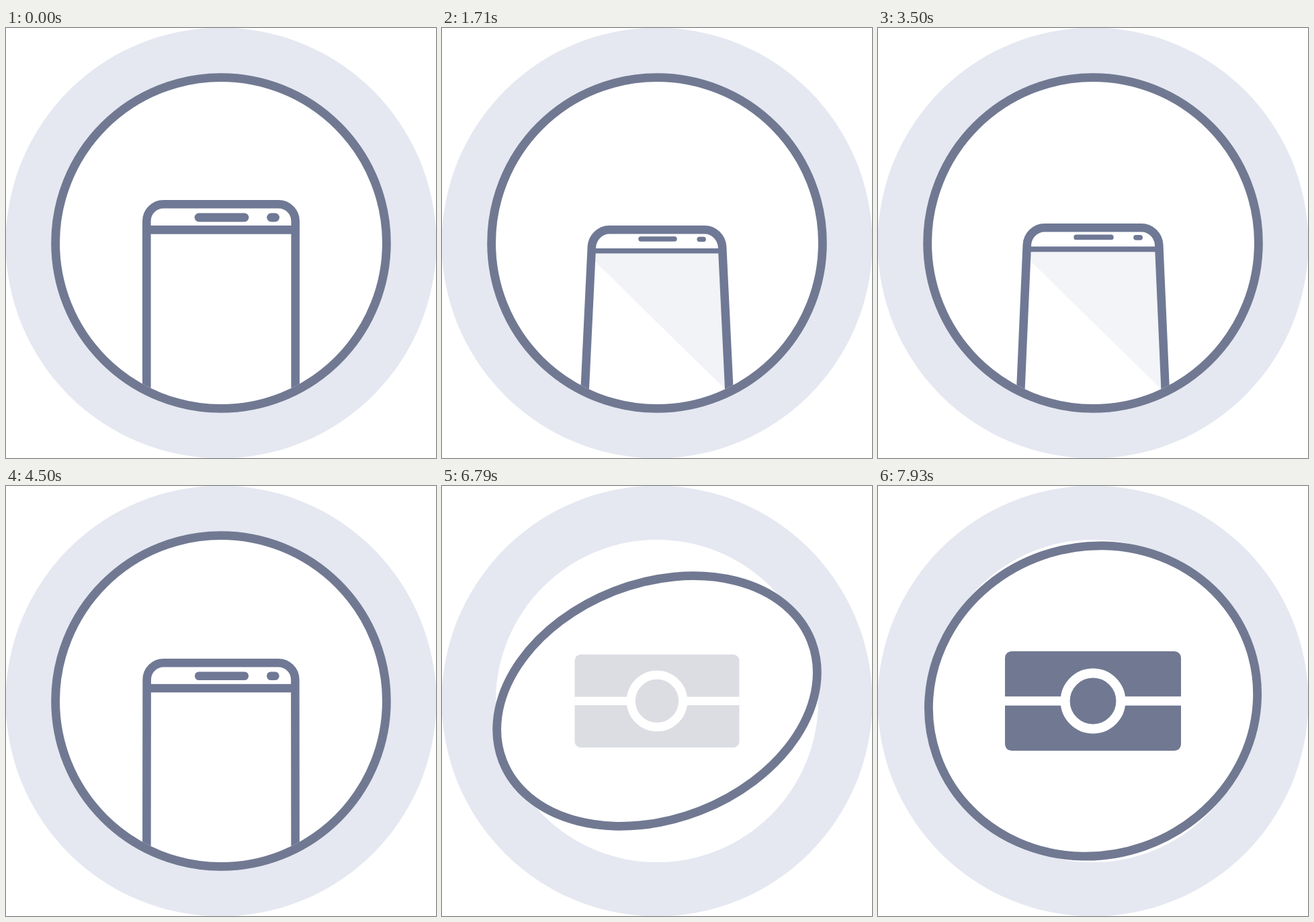
These frames come from a looping animation (640x640 px, 8 s). An HTML page:

```html
<!DOCTYPE html>
<html lang="en">
<head>
<meta charset="utf-8">
<title>Phone to banknote</title>
<style>
  html, body { margin: 0; width: 100%; height: 100%; overflow: hidden; background: #fff; }
  svg { display: block; width: 100vw; height: 100vh; }
</style>
</head>
<body>
<svg viewBox="0 0 640 640">
  <defs>
    <clipPath id="lens"><circle cx="320" cy="320" r="240"/></clipPath>
    <clipPath id="scanned"><rect id="scanArea" x="0" width="640" height="640"/></clipPath>
    <linearGradient id="glow" x1="0" y1="0" x2="0" y2="1">
      <stop offset="0" stop-color="#e681ae" stop-opacity=".32"/>
      <stop offset="1" stop-color="#e681ae" stop-opacity="0"/>
    </linearGradient>
  </defs>
  <circle cx="320" cy="320" r="320.5" fill="#e5e8f1"/>
  <circle cx="320" cy="320" r="240" fill="#fff"/>

  <g clip-path="url(#lens)">
    <g id="phone" fill="none" stroke="#6f7995">
      <path id="face" stroke="none"/>
      <path id="shade" stroke="none" fill="#f1f3f6"/>
      <path id="frame" stroke-width="12.6"/>
      <path id="bar"/>
      <g id="details" stroke-linecap="round">
        <path id="speaker"/>
        <path id="camera"/>
      </g>
      <circle id="dot" cx="320"/>
    </g>
    <g id="note">
      <rect id="pale" fill="#dcdde3"/>
      <g clip-path="url(#scanned)"><rect id="dark" fill="#717992"/></g>
      <path id="stripe" stroke="#fff"/>
      <circle id="coin" cx="320" cy="320" fill="none" stroke="#fff"/>
      <circle id="core" cx="320" cy="320" fill="none"/>
    </g>
  </g>

  <ellipse id="ring" cx="320" cy="320" rx="246.4" fill="none" stroke="#717992" stroke-width="12.8"/>

  <g clip-path="url(#lens)">
    <g id="scan">
      <path d="M80 6H560V94L320 64L80 94Z" fill="url(#glow)"/>
      <rect x="80" y="-6.5" width="480" height="13" fill="#e681ae"/>
    </g>
  </g>
</svg>
<script>
const LOOP = 8000;
const MORPH = 5000, NOTE = 5710, SPIN = 6000;
const PHONE = [111, 121, 149], WHITE = [255, 255, 255], PALE = [223, 224, 230], GREY = [220, 221, 227];

const el = {};
document.querySelectorAll('[id]').forEach(e => el[e.id] = e);

const set = (e, attrs) => { for (const k in attrs) e.setAttribute(k, attrs[k]); };
const show = (e, on) => e.setAttribute('display', on ? 'inline' : 'none');
const mix = (a, b, k) => a + (b - a) * k;
const clamp = x => Math.min(1, Math.max(0, x));
const span = (t, a, b) => clamp((t - a) / (b - a));
const blend = (a, b, k) => a.map((v, i) => mix(v, b[i], k));
const rgb = c => `rgb(${c.map(Math.round)})`;

// cubic-bezier(.9, 0, .1, 1)
function ease(x) {
  let lo = 0, hi = 1;
  for (let i = 0; i < 30; i++) {
    const s = (lo + hi) / 2, r = 1 - s;
    if (2.7 * r * r * s + .3 * r * s * s + s * s * s < x) lo = s; else hi = s;
  }
  return lo * lo * (3 - 2 * lo);
}

// Smooth monotone curve through [time, value] keys
function track(...keys) {
  const sec = keys.slice(1).map((k, i) => (k[1] - keys[i][1]) / (k[0] - keys[i][0]));
  const slope = keys.map((_, i) => {
    const a = sec[i - 1], b = sec[i];
    return a * b > 0 ? 2 * a * b / (a + b) : 0;
  });
  const last = keys.length - 1;
  return t => {
    if (t <= keys[0][0]) return keys[0][1];
    if (t >= keys[last][0]) return keys[last][1];
    const i = keys.findIndex(k => k[0] > t) - 1;
    const [t0, v0] = keys[i], [t1, v1] = keys[i + 1];
    const d = t1 - t0, u = (t - t0) / d, w = 1 - u;
    return v0 * w * w * (1 + 2 * u) + v1 * u * u * (3 - 2 * u)
      + d * u * w * (slope[i] * w - slope[i + 1] * u);
  };
}

const morphHalf = track([5000, 117], [5140, 119], [5320, 126], [5500, 122], [5710, 122.5]);
const morphTop = track([5000, 256], [5140, 254], [5320, 246], [5500, 251], [5710, 250.8]);
const morphBottom = track([5100, 638], [5220, 590], [5320, 480], [5500, 392], [5710, 389.2]);
const morphBar = track([5000, 300.3], [5500, 318], [5710, 320]);
const morphDot = track([5220, 0], [5500, 19], [5710, 38.6]);
const spinX = track([6000, 0], [6790, 40.8], [7360, 115.3], [7740, 206], [7930, 200.3], [8100, 190]);
const spinY = track([6000, 0], [6790, 19.6], [7360, 30.2], [7930, 7.4], [8100, 0]);
const noteScale = track([6790, .935], [7360, .982], [7930, 1]);
const scanY = track([6980, 610], [7100, 560], [7360, 397.5], [7800, 76], [7900, 20]);

// Rounded body along the middle of its outline
function bodyPath(half, halfBottom, top, bottom, r) {
  const lean = (halfBottom - half) * r / (bottom - top);
  const L = 320 - half, R = 320 + half, k = r * .45;
  return `M${L + r} ${top}H${R - r}C${R - k} ${top} ${R} ${top + k} ${R + lean} ${top + r}`
    + `L${320 + halfBottom} ${bottom - r}Q${320 + halfBottom} ${bottom} ${320 + halfBottom - r} ${bottom}`
    + `H${320 - halfBottom + r}Q${320 - halfBottom} ${bottom} ${320 - halfBottom} ${bottom - r}`
    + `L${L - lean} ${top + r}C${L} ${top + k} ${L + k} ${top} ${L + r} ${top}Z`;
}

function drawPhone(t) {
  const p = t < MORPH ? ease(1 - Math.abs(t / 2500 - 1)) : 0;
  const q = span(t, 5140, 5480);
  const half = morphHalf(t) - 6.3 - 15.8 * p;
  const top = morphTop(t) + 6.3 + 40.8 * p;
  const barY = morphBar(t) + 33.7 * p;
  const body = bodyPath(half, morphHalf(t) - 6.3, top, morphBottom(t) - 6.3, mix(25, 4, q));
  const tone = blend(PALE, GREY, span(t, 5500, NOTE));
  const fill = rgb(blend(WHITE, tone, q));
  const line = rgb(blend(blend(PHONE, [242, 242, 245], q), WHITE, span(t, 5500, NOTE)));

  set(el.face, { d: body, fill });
  set(el.frame, { d: body, stroke: rgb(blend(PHONE, tone, q)) });
  set(el.shade, {
    d: `M${320 - half} ${barY}H${320 + half}L428 544L222 342Z`,
    opacity: p
  });
  const reach = half + 6.3 * q;
  set(el.bar, {
    d: `M${320 - reach} ${barY}H${320 + reach}`,
    stroke: line, 'stroke-width': 12.8 - 5.6 * p
  });

  const y = 282 + 34.4 * p + (top - 262.3 - 40.8 * p);
  const width = 12.8 - 5.8 * p;
  set(el.speaker, { d: `M${287 + 9.6 * p} ${y}H${355 - 9.6 * p}`, 'stroke-width': width });
  set(el.camera, { d: `M${394.6 - 12.3 * p} ${y + .5 * p}H${400.6 - 12.3 * p}`, 'stroke-width': width });
  el.details.setAttribute('opacity', 1 - span(t, 5050, 5300));

  const r = morphDot(t);
  show(el.dot, r > .1);
  set(el.dot, { cy: barY, r, fill, stroke: line, 'stroke-width': Math.min(12.8, r) });
}

function drawNote(t) {
  const s = noteScale(t), w = 262 * s, h = 148.2 * s;
  const box = { x: 320 - w / 2, y: 320 - h / 2, width: w, height: h, rx: 10 * s };
  set(el.pale, box);
  set(el.dark, box);
  set(el.stripe, {
    d: `M${320 - w / 2} 320H${320 - 40 * s}M${320 + 40 * s} 320H${320 + w / 2}`,
    'stroke-width': 13.6 * s
  });
  set(el.coin, { r: 41.4 * s, 'stroke-width': 14 * s });
  el.scanArea.setAttribute('y', scanY(t) - 15.5);
}

function drawRing(t) {
  const a = spinX(t) * Math.PI / 180, b = spinY(t) * Math.PI / 180;
  const nx = Math.cos(a) * Math.sin(b), ny = Math.sin(a), nz = Math.cos(a) * Math.cos(b);
  const turn = t > SPIN ? Math.atan2(ny, nx) * 180 / Math.PI - 90 : 0;
  set(el.ring, { ry: 246.4 * Math.abs(nz), transform: `rotate(${turn} 320 320)` });
}

function draw(t) {
  const isNote = t >= NOTE;
  show(el.phone, !isNote);
  show(el.note, isNote);
  if (isNote) drawNote(t); else drawPhone(t);
  drawRing(t);
  show(el.scan, t > 6980 && t < 7900);
  el.scan.setAttribute('transform', `translate(0 ${scanY(t)})`);
}

const start = performance.now();
function tick() {
  draw((performance.now() - start) % LOOP);
  requestAnimationFrame(tick);
}
tick();
</script>
</body>
</html>
```
